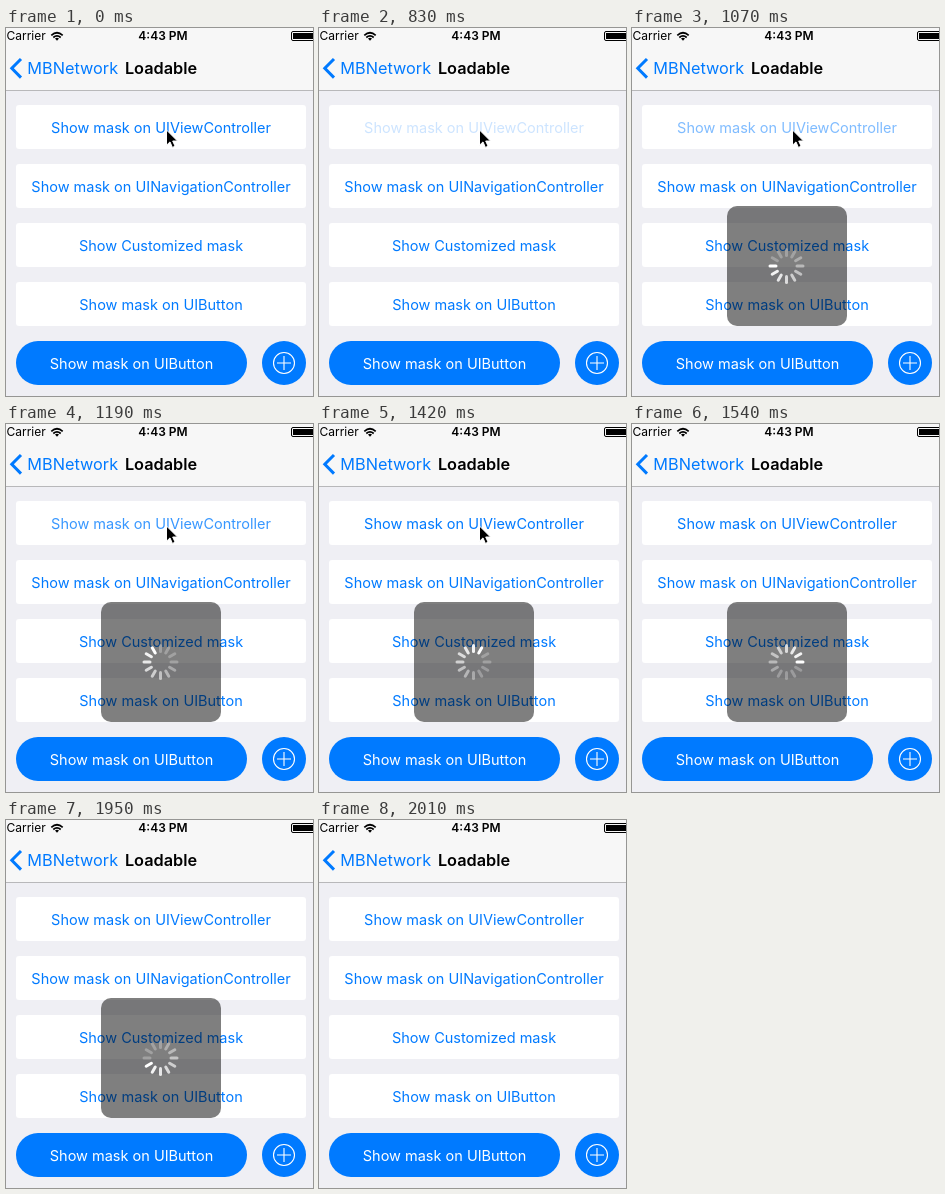
Recreate the animation shown at these times as an HTML page. Size 307 px wide and 368 px high, loop 3.47 s.

```html
<!DOCTYPE html>
<html lang="en">
<head>
<meta charset="utf-8">
<title>Loadable</title>
<style>
  html, body { margin: 0; width: 100%; height: 100%; overflow: hidden; background: #efeff4; }
  svg { display: block; width: 100vw; height: 100vh; }
  text { font-family: Inter, Roboto, sans-serif; }
  .label { font-size: 14.5px; text-anchor: middle; fill: #007aff; }
  .nav { font-size: 16.3px; }
  .status { font-size: 12px; }
  .bold { font-weight: 600; text-anchor: middle; }
</style>
</head>
<body>
<svg viewBox="0 0 307 368">
  <rect width="307" height="368" fill="#efeff4"/>
  <rect width="307" height="62" fill="#f7f7f7"/>
  <rect y="62" width="307" height="1" fill="#b8b8ba"/>

  <text class="status" x="0.5" y="12.3">Carrier</text>
  <g fill="none" stroke="#000" stroke-width="1.7">
    <path d="M45.3 7.3Q51 2.2 56.7 7.3M47.3 9.5Q51 6.2 54.7 9.5"/>
    <path d="M49 10.6Q51 9 53 10.6L51 12.8Z" fill="#000" stroke="none"/>
  </g>
  <text class="status bold" x="157" y="12.3">4:43 PM</text>
  <rect x="285.5" y="3.5" width="24" height="9" rx="1.5" fill="none" stroke="#000"/>
  <rect x="287" y="5" width="22" height="6" fill="#000"/>

  <path d="M15 31L5.8 40.3L15 49.6" fill="none" stroke="#007aff" stroke-width="3"/>
  <text class="nav" x="21.3" y="46" fill="#007aff">MBNetwork</text>
  <text class="nav bold" x="155" y="46">Loadable</text>

  <g id="rows"></g>
  <rect x="10" y="313" width="231" height="44" rx="22" fill="#007aff"/>
  <text class="label" x="125.5" y="340.7" style="fill:#fff">Show mask on UIButton</text>
  <circle cx="278" cy="335" r="22" fill="#007aff"/>
  <g fill="none" stroke="#fff" stroke-width="1.1">
    <circle cx="278" cy="335" r="10.5"/>
    <path d="M271 335h14M278 328v14"/>
  </g>

  <g id="mask">
    <rect x="95" y="178" width="120" height="120" rx="10" fill-opacity="0.5"/>
    <g id="spinner" transform="translate(154.5 238)" fill="#fff"></g>
  </g>
  <path id="cursor" d="M160.5 102v15.2l3.5-3.3 2.4 5.5 2.7-1.2-2.4-5.2h4.8z" stroke="#fff" stroke-width="1"/>
</svg>
<script>
  const LOOP = 3470, PRESS = 830, SHOW = 1010, LEAVE = 1535, HIDE = 2008;
  const STEP = 58.75, FINS = 12;
  const NS = 'http://www.w3.org/2000/svg';
  const $ = id => document.getElementById(id);

  function add(parent, tag, attrs, text) {
    const el = document.createElementNS(NS, tag);
    for (const k in attrs) el.setAttribute(k, attrs[k]);
    if (text) el.textContent = text;
    parent.appendChild(el);
    return el;
  }

  const labels = [
    'Show mask on UIViewController',
    'Show mask on UINavigationController',
    'Show Customized mask',
    'Show mask on UIButton'
  ].map((text, i) => {
    const y = 77 + i * 59;
    add($('rows'), 'rect', { x: 10, y, width: 290, height: 44, rx: 3, fill: '#fff' });
    return add($('rows'), 'text', { class: 'label', x: 155, y: y + 27.7 }, text);
  });

  const fins = Array.from({ length: FINS }, (_, i) => add($('spinner'), 'rect', {
    x: -1.5, y: -18, width: 3, height: 9, rx: 1.5, transform: `rotate(${i * 360 / FINS})`
  }));

  function labelAlpha(t) {
    if (t < PRESS) return 1;
    if (t < SHOW) return 0.2;
    return Math.min(1, 0.2 + 0.8 * (t - 945) / 330);
  }

  function draw(time) {
    let t = time % LOOP;
    // the motion runs at a coarse frame rate
    if (t >= SHOW) t = SHOW + STEP * Math.floor((t - SHOW) / STEP + 0.03);

    labels[0].setAttribute('fill-opacity', labelAlpha(t));
    $('cursor').style.display = t < LEAVE ? '' : 'none';
    $('mask').style.display = t >= SHOW && t < HIDE ? '' : 'none';

    const head = 9 + Math.floor(Math.max(0, t - SHOW) * FINS / 1000);
    fins.forEach((fin, i) => {
      const age = (head - i + FINS * 4) % FINS;
      fin.setAttribute('fill-opacity', Math.max(0.27, 1 - age * 0.09));
    });
  }

  const start = performance.now();
  function tick() {
    draw(performance.now() - start);
    requestAnimationFrame(tick);
  }
  tick();
</script>
</body>
</html>
```
